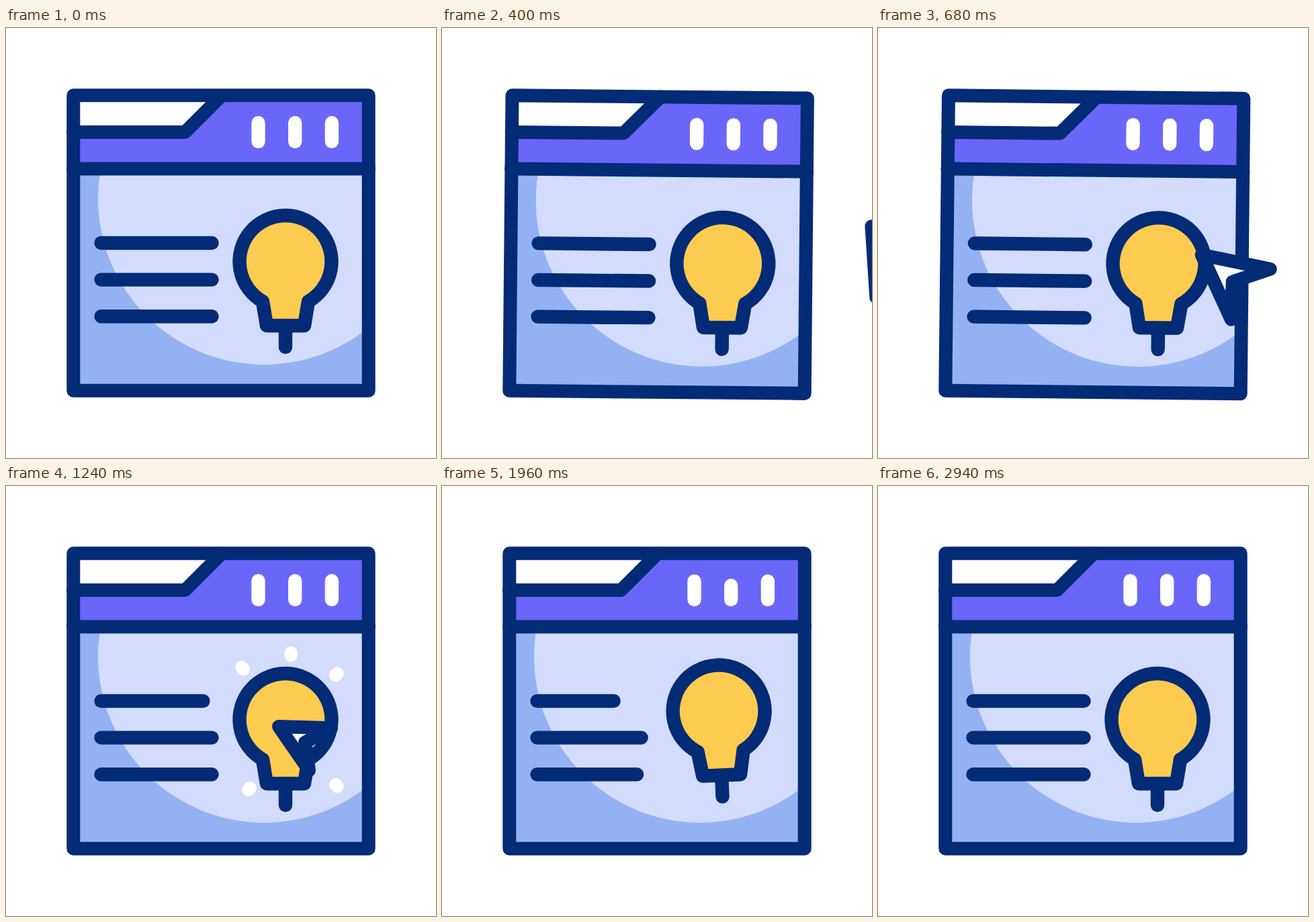
Write an HTML page that moves like this. It is 640 px wide and 640 px high and loops after 3.02 s.

```html
<!DOCTYPE html>
<html lang="en">
<head>
<meta charset="utf-8">
<title>Idea window</title>
<style>
  html, body { margin: 0; width: 100%; height: 100%; overflow: hidden; background: #fff; }
  svg { display: block; width: 100%; height: 100%; }
  .ink { stroke: #032b76; stroke-width: 20.4; stroke-linecap: round; stroke-linejoin: round; fill: none; }
  .chalk { stroke: #fff; stroke-width: 20.4; stroke-linecap: round; }
  .frame { stroke-width: 20; }
</style>
</head>
<body>
<svg viewBox="0 0 640 640">
  <defs>
    <clipPath id="page"><rect x="100" y="209" width="440" height="331"/></clipPath>
  </defs>
  <g id="window">
    <rect x="100" y="100" width="440" height="440" fill="#94b2f3"/>
    <circle cx="384" cy="254" r="247" fill="#d3dcfd" clip-path="url(#page)"/>
    <rect x="100" y="100" width="440" height="109" fill="#6a66f9"/>
    <path d="M100 100H321L266.5 155H100Z" fill="#fff"/>
    <path class="ink frame" d="M100 155H266.5L321 100.5M100 209.5H540"/>
    <rect class="ink frame" x="100.3" y="100.3" width="439.4" height="439.4"/>
    <g id="bars"></g>
    <g id="lines"></g>
    <g id="rays"></g>
    <g id="bulb">
      <path class="ink" d="M416 443V475"/>
      <path class="ink" style="fill:#fdcb50" d="M382 407A68.5 68.5 0 1 1 450 407L444 443H388Z"/>
    </g>
  </g>
  <path id="cursor" class="ink" style="fill:#fff" d="M0 0L102 21L46 40L44 96Z"/>
</svg>
<script>
const LOOP = 3020;
const RAYS = [[424, 250], [352, 271], [492, 280], [362, 451], [492, 446]];
const $ = id => document.getElementById(id);

// Eased 0 to 1 between times a and b
function ramp(t, a, b) {
  const u = Math.min(1, Math.max(0, (t - a) / (b - a)));
  return u * u * (3 - 2 * u);
}
// Rises to 1 at the peak and falls back to 0
const pulse = (t, a, peak, b) => ramp(t, a, peak) - ramp(t, peak, b);

// Two swings to each side, in five equal legs
function swing(t, start, leg, high, low) {
  const at = i => start + i * leg;
  return high * (pulse(t, at(0), at(1), at(2)) + pulse(t, at(2), at(3), at(4)))
       + low * (pulse(t, at(1), at(2), at(3)) + pulse(t, at(3), at(4), at(5)));
}

const tilt = t => -3.7 * pulse(t, 120, 260, 540) + 4.7 * pulse(t, 260, 540, 722);
const barTop = t => 141.2 + swing(t, 1610, 220, 16, -8);
const lineEnd = t => 306.5 - 165 * pulse(t, 1212, 1380, 1580) - 62 * pulse(t, 1640, 2080, 2400);

function addLine(parent, cls) {
  const el = document.createElementNS("http://www.w3.org/2000/svg", "line");
  el.setAttribute("class", cls);
  return parent.appendChild(el);
}
function place(el, x1, y1, x2, y2) {
  Object.entries({ x1, y1, x2, y2 }).forEach(([k, v]) => el.setAttribute(k, v.toFixed(2)));
}

const trio = [0, 1, 2];
const bars = trio.map(() => addLine($("bars"), "chalk"));
const lines = trio.map(() => addLine($("lines"), "ink"));
const rays = RAYS.map(([x, y]) => {
  const angle = Math.atan2(y - 360, x - 420);
  return { x, y, dx: Math.cos(angle), dy: Math.sin(angle), el: addLine($("rays"), "chalk") };
});

function drawRays(t) {
  const head = 24 * ramp(t, 1185, 1420) - 2;
  const tail = 24 * ramp(t, 1440, 1660) - 2;
  const width = 19.5 * (ramp(t, 1200, 1230) - ramp(t, 1600, 1740));
  $("rays").style.display = width > 0.1 ? "" : "none";
  for (const { x, y, dx, dy, el } of rays) {
    el.style.strokeWidth = width;
    place(el, x + dx * tail, y + dy * tail, x + dx * head, y + dy * head);
  }
}

function drawCursor(t) {
  const away = 1.37 * (1 - ramp(t, 120, 940) + ramp(t, 1360, 2160));
  const scale = 1 - 0.25 * pulse(t, 1080, 1240, 1400);
  const x = 406 + 234 * away, y = 358 - 63 * away;
  $("cursor").setAttribute("transform",
    `translate(${x} ${y}) rotate(${31 * away - 10}) scale(${scale})`);
  $("cursor").style.strokeWidth = 20 / scale;
}

function draw(t) {
  const lift = 14 * pulse(t, 1580, 1800, 2620);
  const sway = swing(t, 1580, 220, 3, -3.6);
  $("window").setAttribute("transform", `rotate(${tilt(t)} 100 540)`);
  $("bulb").setAttribute("transform", `translate(0 ${-lift}) rotate(${sway} 416 440)`);
  bars.forEach((el, i) => {
    const x = 375.5 + 54.7 * i;
    place(el, x, barTop(t - (i % 2) * 250), x, 169);
  });
  lines.forEach((el, i) => {
    const y = 320 + 54.6 * i;
    place(el, 141.5, y, lineEnd(t - i * 210), y);
  });
  drawRays(t);
  drawCursor(t);
}

const start = performance.now();
function tick() {
  draw((performance.now() - start) % LOOP);
  requestAnimationFrame(tick);
}
tick();
</script>
</body>
</html>
```
